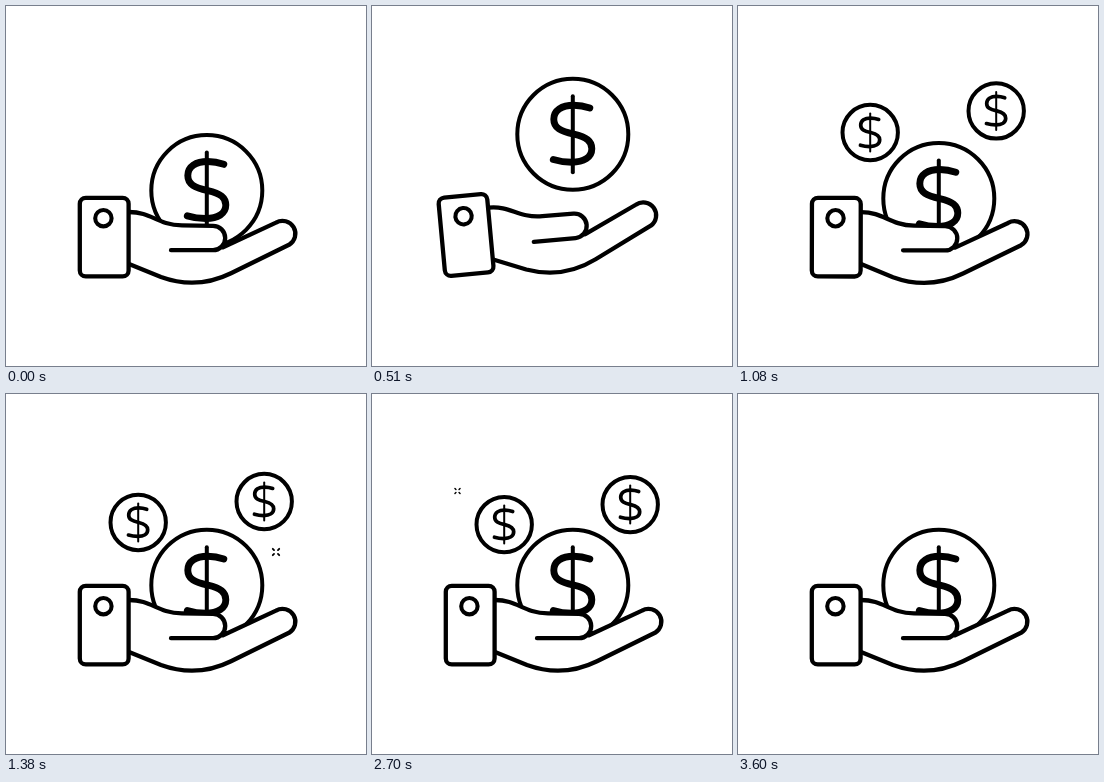
Animation, 360 px wide and 360 px high, one loop 3.66 s. Source, as an HTML page with a canvas:

```html
<!DOCTYPE html>
<html lang="en">
<head>
<meta charset="utf-8">
<title>Coin toss</title>
<style>
  html, body { margin: 0; width: 100%; height: 100%; overflow: hidden; background: #fff; }
  canvas { display: block; width: 360px; height: 360px; }
</style>
</head>
<body>
<canvas id="stage"></canvas>
<script>
const LOOP = 3660;
const canvas = document.getElementById('stage');
const ctx = canvas.getContext('2d');
const ratio = window.devicePixelRatio || 1;
canvas.width = canvas.height = 360 * ratio;

const dollarCurve = new Path2D('M17 -26.2C11 -28.3 6 -29 1 -29C-11 -29 -19 -24 -19 -15' +
  'C-19 -6 -12 -3 1 0C14 3 19 7 19 14.5C19 23 11 28 -1 28C-8 28 -14 27 -19.5 25.3');
const thumb = 'M123 206C140 206 147 213 160 217C165 218.6 170 219.4 176 219.4L207 219.8' +
  'A12.2 12.2 0 0 1 207 244.2';
const finger = '217 241.3L270 216.6A12.8 12.8 0 0 1 283 238.8L225 267.2C201 279 177 279 155 271L123 258';
const palmFill = new Path2D(thumb + 'L' + finger + 'Z');
const palmLines = new Path2D(thumb + 'L165 244.2M' + finger);
const cuff = new Path2D();
cuff.roundRect(73.8, 191.8, 48.8, 78.6, 6);
const aboveHand = new Path2D('M0 0H360V225L276 228L215 242H0Z');

// Keys are [time, value] pairs joined by a smooth ease.
function ease(keys, t) {
  if (t <= keys[0][0]) return keys[0][1];
  for (let i = 1; i < keys.length; i++) {
    const [t0, v0] = keys[i - 1], [t1, v1] = keys[i];
    if (t <= t1) {
      const u = (t - t0) / (t1 - t0);
      return v0 + (v1 - v0) * u * u * (3 - 2 * u);
    }
  }
  return keys[keys.length - 1][1];
}

const tossStart = -50;
const coinHeight = [[tossStart, 191.2], [285, 85], [840, 204.3], [1140, 191.2]];
const handTilt = [[0, 0], [275, -15.8], [680, 1.1], [840, 1.1], [1140, 0]];
const smallCoins = [
  { x: 132.2, y: [[835, 240], [1095, 125.6], [1620, 130.6], [3205, 130.6], [3540, 240]] },
  { x: 258.2, y: [[835, 260], [1095, 103.6], [1620, 110.6], [3205, 110.6], [3540, 260]] }
];
const sparkles = [[270, 158, 1290], [132, 178, 1730], [85.5, 97, 2172]];
const SPARKLE_LIFE = 600;

function stroke(path, width) {
  ctx.lineWidth = width;
  ctx.stroke(path);
}

function drawCoin(x, y, radius, scale, rim, curveWidth) {
  const circle = new Path2D();
  circle.arc(0, 0, radius, 0, Math.PI * 2);
  const bar = new Path2D('M0 -38V38');
  ctx.save();
  ctx.translate(x, y);
  ctx.fill(circle);
  stroke(circle, rim);
  ctx.scale(scale, scale);
  stroke(dollarCurve, curveWidth);
  stroke(bar, 4);
  ctx.restore();
}

function drawHand(degrees) {
  const button = new Path2D();
  button.arc(97.4, 212.2, 8.2, 0, Math.PI * 2);
  ctx.save();
  ctx.translate(73, 275);
  ctx.rotate(degrees * Math.PI / 180);
  ctx.translate(-73, -275);
  ctx.fill(palmFill);
  stroke(palmLines, 4.3);
  ctx.fill(cuff);
  stroke(cuff, 4.3);
  stroke(button, 4.1);
  ctx.restore();
}

function drawSparkle(x, y, progress) {
  if (progress <= 0 || progress >= 1) return;
  const size = Math.sin(Math.PI * progress);
  ctx.save();
  ctx.translate(x, y);
  ctx.scale(size, size);
  stroke(new Path2D('M4.3 4.3L7 7M-4.3 4.3L-7 7M4.3 -4.3L7 -7M-4.3 -4.3L-7 -7'), 4);
  ctx.restore();
}

function draw(t) {
  ctx.setTransform(ratio, 0, 0, ratio, 0, 0);
  ctx.fillStyle = '#fff';
  ctx.strokeStyle = '#000';
  ctx.lineCap = ctx.lineJoin = 'round';
  ctx.fillRect(0, 0, 360, 360);

  if (t > 835 && t < 3540) {
    ctx.save();
    ctx.clip(aboveHand);
    for (const { x, y } of smallCoins) drawCoin(x, ease(y, t), 27.7, 0.5, 4, 7.4);
    ctx.restore();
  }
  const tossTime = t > LOOP + tossStart ? t - LOOP : t;
  drawCoin(200.8, ease(coinHeight, tossTime), 55.5, 1, 4, 6.9);
  drawHand(ease(handTilt, t));
  for (const [x, y, start] of sparkles) drawSparkle(x, y, (t - start) / SPARKLE_LIFE);
}

const began = performance.now();
function tick() {
  draw((performance.now() - began) % LOOP);
  requestAnimationFrame(tick);
}
tick();
</script>
</body>
</html>
```
